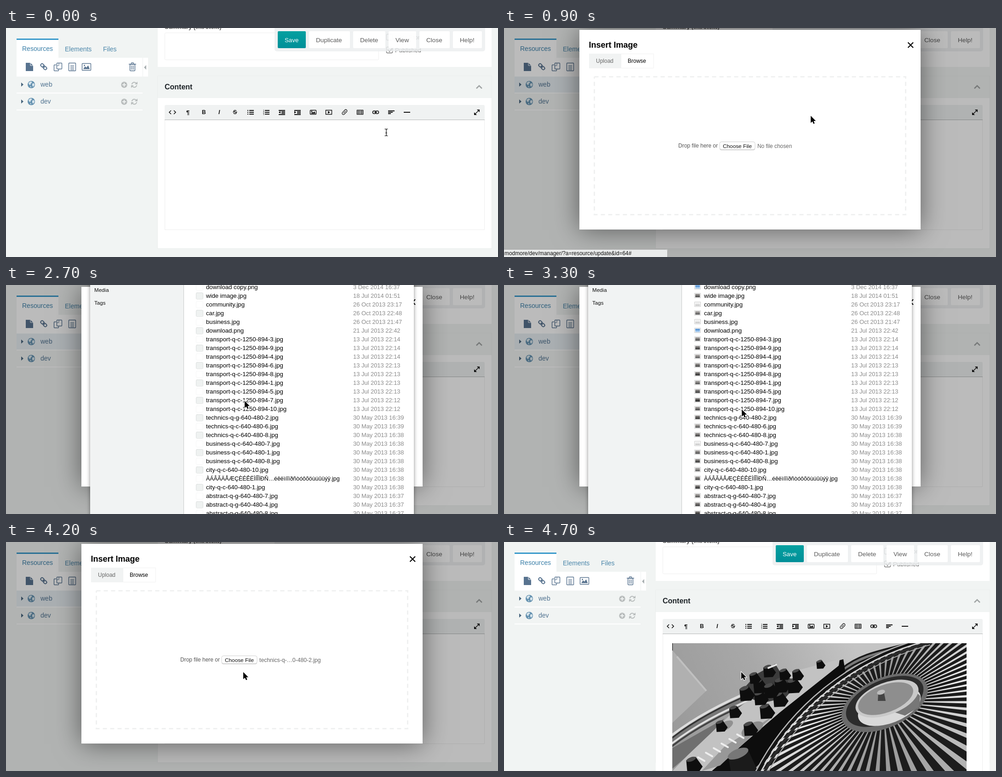
An HTML page with a canvas that plays this animation: 1070 by 500 pixels, repeating every 7.2 s.

```html
<!DOCTYPE html>
<html lang="en">
<head>
<meta charset="utf-8">
<title>Insert image</title>
<style>
html, body { margin: 0; width: 100%; height: 100%; overflow: hidden; background: #f1f4f3; }
canvas { display: block; }
</style>
</head>
<body>
<canvas id="stage" width="1070" height="500"></canvas>
<script>
const ctx = document.getElementById('stage').getContext('2d');
const LOOP = 7200, STEP = 100;
const SANS = '"Liberation Sans", Arial, sans-serif';
const BLUE = '#58738f';

// ---------- helpers ----------
function text(str, x, y, size, color, weight = '') {
  ctx.font = `${weight} ${size}px ${SANS}`;
  ctx.fillStyle = color;
  ctx.fillText(str, x, y);
}
function box(x, y, w, h, fill, r = 0) {
  ctx.beginPath();
  ctx.roundRect(x, y, w, h, r);
  ctx.fillStyle = fill;
  ctx.fill();
}
function frame(x, y, w, h, color, lw = 1, r = 0) {
  ctx.beginPath();
  ctx.roundRect(x, y, w, h, r);
  ctx.strokeStyle = color;
  ctx.lineWidth = lw;
  ctx.stroke();
}
function trace(p) {
  ctx.beginPath();
  for (let i = 0; i < p.length; i += 2) ctx.lineTo(p[i], p[i + 1]);
}
function poly(p, fill) {
  trace(p);
  ctx.closePath();
  ctx.fillStyle = fill;
  ctx.fill();
}
function line(p, color, lw = 1) {
  trace(p);
  ctx.strokeStyle = color;
  ctx.lineWidth = lw;
  ctx.stroke();
}
function oval(x, y, rx, ry, turn, fill) {
  ctx.beginPath();
  ctx.ellipse(x, y, rx, ry, turn, 0, 7);
  ctx.fillStyle = fill;
  ctx.fill();
}
function at(x, y, draw, turn = 0) {
  ctx.save();
  ctx.translate(x, y);
  ctx.rotate(turn);
  draw();
  ctx.restore();
}
const clamp = v => Math.max(0, Math.min(1, v));
const ease = v => v * v * (3 - 2 * v);
const mix = (a, b, p) => a + (b - a) * p;

// ---------- icons, drawn around 0,0 ----------
function chain(color, s) {
  ctx.save();
  ctx.rotate(Math.PI / 4);
  frame(-8 * s, -3 * s, 8 * s, 6 * s, color, 2, 3 * s);
  frame(0, -3 * s, 8 * s, 6 * s, color, 2, 3 * s);
  line([-3 * s, 0, 3 * s, 0], color, 2);
  ctx.restore();
}
function picture(color, w, h) {
  frame(-w / 2 + .5, -h / 2 + .5, w - 1, h - 1, color, 1.4, 1);
  poly([-w * .35, h * .3, -w * .15, -h * .08, 0, h * .1, w * .18, -h * .22, w * .36, h * .3], color);
  oval(-w * .22, -h * .2, 1.5, 1.5, 0, color);
}
function globe() {
  oval(0, 0, 8, 8, 0, '#6592b0');
  poly([-6, -4, -1, -7, 2, -5, -1, -2, -2, 1, -5, 0], '#d8e5ec');
  poly([2, -2, 6, -3, 7, 1, 4, 5, 2, 2], '#d8e5ec');
  poly([-3, 3, 0, 4, -1, 7], '#d8e5ec');
}
function refresh() {
  ctx.strokeStyle = '#b9bdbd';
  ctx.lineWidth = 2;
  for (const a of [3.3, .16]) {
    ctx.beginPath();
    ctx.arc(0, 0, 5.4, a, a + 2.3);
    ctx.stroke();
  }
  poly([7, -7, 7, -1, 1, -1], '#b9bdbd');
  poly([-7, 7, -7, 1, -1, 1], '#b9bdbd');
}
function bullets() {
  for (let y = -4; y <= 4; y += 4) {
    box(-7, y - 1, 2, 2, '#111');
    box(-3, y - 1, 10, 2, '#111');
  }
}
function numbers() {
  for (let i = 0; i < 3; i++) {
    text(String(i + 1), -7, i * 4 - 2, 4.5, '#111');
    box(-3, i * 4 - 5, 10, 2, '#111');
  }
}
function indent(dir) {
  box(-7, -5, 14, 2, '#111');
  box(-1, -2, 8, 2, '#111');
  box(-1, 1, 8, 2, '#111');
  box(-7, 4, 14, 2, '#111');
  poly(dir < 0 ? [-3, -3, -3, 3, -7, 0] : [-7, -3, -7, 3, -3, 0], '#111');
}
const tools = [
  () => { line([-3, -4, -7, 0, -3, 4], '#111', 1.6); line([3, -4, 7, 0, 3, 4], '#111', 1.6); },
  () => text('¶', -4, 5, 13, '#111', 'bold'),
  () => text('B', -4, 4, 12, '#111', 'bold'),
  () => text('I', -2, 4, 12, '#111', 'italic bold'),
  () => { text('S', -4, 4, 12, '#111', 'bold'); box(-5, -1, 10, 1, '#111'); },
  bullets,
  numbers,
  () => indent(-1),
  () => indent(1),
  hover => picture(hover ? '#777' : '#111', 14, 10),
  () => { frame(-6.5, -4.5, 13, 9, '#111', 1.4); poly([-2, -3, -2, 3, 3, 0], '#111'); },
  () => at(0, 0, () => {
    frame(-6, -2.8, 13, 5.6, '#222', 1.3, 2.8);
    line([4, 0, -3, 0], '#222', 1.3);
  }, -.8),
  () => {
    frame(-6.5, -4.5, 13, 9, '#111', 1.4);
    line([-6, -1.5, 6, -1.5], '#111'); line([-6, 1.5, 6, 1.5], '#111');
    line([-2.5, -4, -2.5, 4], '#111'); line([2.5, -4, 2.5, 4], '#111');
  },
  () => {
    frame(-6.5, -3, 7, 6, '#111', 1.6, 3);
    frame(-.5, -3, 7, 6, '#111', 1.6, 3);
    line([-3, 0, 3, 0], '#111', 1.6);
  },
  () => { box(-7, -4, 14, 2, '#111'); box(-7, -1, 10, 2, '#111'); box(-7, 2, 6, 2, '#111'); },
  () => box(-7, -1, 14, 2, '#111')
];

// ---------- page ----------
function sidebar(dimmed) {
  box(23, 23, 91, 42, '#fff');
  box(23, 23, 91, 3, '#3a9acb');
  text('Resources', 35, 50, 14, '#3a7fa8');
  text('Elements', 128, 51, 14, '#4b86aa');
  text('Files', 211, 51, 14, '#4b86aa');
  box(23, 65, 286, 41, '#fff');
  box(297, 65, 1, 41, '#edefef');
  poly([305, 81, 305, 91, 300, 86], '#a9b0b2');

  poly([43, 76, 53, 76, 59, 82, 59, 94, 43, 94], BLUE);
  line([53, 76, 53, 82, 59, 82], '#fff');
  at(82, 84.5, () => chain(BLUE, 1));
  frame(104.5, 80.5, 10, 13, BLUE, 1.4, 1);
  box(109, 75, 13, 15, '#fff');
  frame(110.5, 76.5, 11, 13, BLUE, 1.4, 1);
  line([110, 82, 115, 82, 115, 76], BLUE);
  frame(136.5, 76.5, 15, 17, BLUE, 1.4, 1);
  for (let y = 82; y < 92; y += 3) line([140, y, 148, y], BLUE, 1.2);
  at(175, 85, () => picture(BLUE, 20, 16));
  frame(269.5, 79.5, 11, 14, BLUE, 1.4, 1.5);
  line([267, 79, 283, 79], BLUE, 1.5);
  line([272, 78, 273, 76, 277, 76, 278, 78], BLUE, 1.3);
  for (let x = 272.5; x < 280; x += 2.5) line([x, 82, x, 91], BLUE);

  if (dimmed) box(23, 106, 274, 35, 'rgba(110,160,225,.07)');
  ['web', 'dev'].forEach((name, i) => {
    const y = 123.5 + i * 37;
    poly([33, y - 4.5, 38, y, 33, y + 4.5], '#48667e');
    at(55, y, globe);
    text(name, 75, y + 4.5, 14, '#517391');
    oval(257, y + .5, 6.7, 6.7, 0, '#b9bdbd');
    line([253, y + .5, 261, y + .5], '#f1f4f3', 2);
    line([257, y - 3.5, 257, y + 4.5], '#f1f4f3', 2);
    at(279, y + .5, refresh);
    box(23, y + 17.5, 274, 2, '#fff');
  });
}

function actionBar() {
  ctx.globalAlpha = .84;
  box(584, -6, 458, 57, '#eceff0', 5);
  ctx.globalAlpha = 1;
  const teal = ctx.createLinearGradient(0, 7, 0, 44);
  teal.addColorStop(0, '#05a0a0');
  teal.addColorStop(1, '#008f98');
  box(591, 7, 61, 37, teal, 2);
  text('Save', 606, 31, 13.3, '#fff');
  const buttons = [['Duplicate', 659, 89], ['Delete', 755, 70], ['View', 832, 60], ['Close', 899, 66], ['Help!', 972, 63]];
  for (const [name, x, w] of buttons) {
    box(x, 7, w, 37, name === 'View' ? 'rgba(255,255,255,.92)' : '#fff', 2);
    text(name, x + 15, 31, 13.6, '#5b5b5b');
  }
}

function page(hover, photo, dimmed) {
  box(0, 0, 1070, 500, '#f1f4f3');
  sidebar(dimmed);
  box(330, 0, 726, 85, '#fff');
  text('Summary (introtext)', 345, 2, 13, '#555', 'bold');
  frame(345.5, 10.5, 465, 59, '#efefef', 1, 2);
  frame(827.5, 13.5, 13, 13, '#888', 1.3, 2);
  text('Hide From Menus', 846, 25, 13, '#555');
  frame(827.5, 41.5, 13, 13, '#777', 1.3, 2);
  line([830, 47, 834, 51, 842, 42], '#666', 2.4);
  text('Published', 846, 53, 13, '#555');
  actionBar();

  frame(329.5, 104.5, 727, 377, 'rgba(0,0,0,.025)');
  text('Content', 345, 134, 16, '#1d2327', 'bold');
  line([1023, 132, 1029, 126, 1035, 132], '#a0a4a4', 2.6);
  box(330, 153, 726, photo ? 347 : 328, '#fff');
  box(345, 168, 696, 32, '#f0f2f2', [3, 3, 0, 0]);
  frame(345.5, 200.5, 695, photo ? 320 : 240, '#ededed');
  box(345, 200, 696, 1, '#b4b6b6');
  tools.forEach((draw, i) => at(362 + i * 34, 184, () => draw(hover)));
  line([1020, 188, 1028, 180], '#111', 1.5);
  poly([1024, 178, 1030, 178, 1030, 184], '#111');
  poly([1018, 184, 1018, 190, 1024, 190], '#111');
  if (photo) {
    drawPhoto();
    box(366, 221, 1, 16, '#000');
  }
}

// ---------- picture of a mixer and a turntable ----------
function rim(d) {
  ctx.beginPath();
  ctx.moveTo(545 + d, 506 + d * .6);
  ctx.bezierCurveTo(600 + d, 395 + d * .6, 715 + d, 265 + d * .6, 905 + d, 212 + d * .6);
}
function strokeRim(d, color, lw) {
  rim(d);
  ctx.strokeStyle = color;
  ctx.lineWidth = lw;
  ctx.stroke();
}
function knob(x, y, r) {
  at(x, y, () => {
    poly([-r * .6, -r * .9, r * .6, -r * .9, r, r * .5, r * .3, r, -r, r * .6], '#0e0e0e');
    oval(0, -r * .8, r * .6, r * .25, 0, '#4a4a4a');
  }, -.35);
}
function mixer() {
  poly([366, 500, 440, 430, 640, 282, 738, 256, 745, 300, 640, 400, 540, 500], '#0d0d0d');
  poly([366, 500, 400, 465, 505, 365, 620, 285, 730, 256, 728, 270, 600, 372, 452, 500], '#c2c2c2');
  poly([430, 500, 480, 446, 585, 380, 470, 488], '#989898');
  poly([512, 330, 550, 288, 590, 266, 604, 290, 642, 306, 612, 340, 560, 352], '#3c3c3c');
  for (let i = 0; i < 6; i++) line([422 + i * 17, 470 - i * 10, 436 + i * 17, 478 - i * 10], '#eee', 4);
  oval(540, 408, 26, 12, -.5, '#8c8c8c');
  oval(480, 402, 20, 9, -.5, '#919191');
  const knobs = [[502, 372, 14], [571, 371, 17], [535, 409, 16], [472, 403, 13], [558, 342, 16], [600, 345, 17],
    [527, 332, 17], [556, 316, 16], [580, 326, 17], [603, 314, 17], [631, 315, 17], [576, 283, 14], [545, 298, 13],
    [610, 290, 13], [638, 291, 13], [688, 268, 10], [412, 488, 18]];
  for (const k of knobs) knob(...k);
  line([575, 275, 592, 268], '#e4e4e4', 4);
  poly([488, 468, 530, 452, 552, 500, 494, 506], '#1b1b1b');
  oval(509, 462, 24, 10, -.4, '#777');
}
function platter() {
  rim(0);
  ctx.lineTo(1010, 212);
  ctx.lineTo(1010, 506);
  ctx.closePath();
  ctx.fillStyle = '#1c1c1c';
  ctx.fill();
  ctx.save();
  ctx.clip();
  const cx = 824, cy = 348, cos = Math.cos(-.42), sin = Math.sin(-.42), spokes = 64;
  const spot = (a, r) => {
    const u = Math.cos(a) * r, v = Math.sin(a) * r * .56;
    return [cx + u * cos - v * sin, cy + u * sin + v * cos];
  };
  for (let i = 0; i < spokes; i++) {
    const a = i * 2 * Math.PI / spokes, lit = 195 + 40 * Math.sin(a * 2 + 1);
    poly([...spot(a - .012, 80), ...spot(a + .012, 80), ...spot(a + .021, 520), ...spot(a - .021, 520)],
      `rgb(${lit},${lit},${lit})`);
  }
  strokeRim(3, '#151515', 9);
  strokeRim(9, '#d5d5d5', 3);
  strokeRim(15, '#2a2a2a', 6);
  strokeRim(21, '#aaa', 2);
  ctx.restore();
  strokeRim(0, '#b5b5b5', 2.5);

  oval(828, 351, 100, 54, -.42, '#6b6b6b');
  oval(828, 348, 90, 46, -.42, '#2c2c2c');
  oval(838, 359, 72, 36, -.38, '#d9d9d9');
  poly([880, 312, 905, 336, 903, 360, 872, 379, 850, 372], '#777');
  oval(833, 342, 72, 35, -.36, '#c9c9c9');
  oval(830, 342, 63, 30, -.36, '#8e8e8e');
  poly([813, 347, 814, 328, 826, 326, 830, 347], '#444');
  oval(820, 328, 9, 5, -.3, '#bbb');
}
function drawPhoto() {
  ctx.save();
  ctx.beginPath();
  ctx.rect(366, 221, 640, 279);
  ctx.clip();
  const wall = ctx.createLinearGradient(366, 400, 760, 221);
  wall.addColorStop(0, '#9a9a9a');
  wall.addColorStop(.5, '#a8a8a8');
  wall.addColorStop(1, '#c4c4c4');
  box(366, 221, 640, 279, wall);
  poly([366, 236, 440, 325, 366, 395], '#b0b0b0');
  line([376, 250, 440, 325], '#c0c0c0', 4);

  // second deck at the left
  ctx.lineCap = 'round';
  for (const [d, c, w] of [[12, '#777', 14], [0, '#ddd', 5], [6, '#333', 3], [18, '#e0e0e0', 4], [24, '#444', 4]]) {
    ctx.beginPath();
    ctx.moveTo(360, 426 + d);
    ctx.quadraticCurveTo(430, 370 + d, 545, 322 + d);
    ctx.strokeStyle = c;
    ctx.lineWidth = w;
    ctx.stroke();
  }
  poly([366, 450, 480, 385, 430, 440, 366, 495], '#6f6f6f');

  // cables
  for (let i = 0; i < 5; i++) {
    ctx.beginPath();
    ctx.moveTo(735, 276 + i * 5);
    ctx.bezierCurveTo(780, 240 + i * 5, 830, 236 + i * 4, 900, 216 + i * 3);
    ctx.strokeStyle = i % 2 ? '#777' : '#1c1c1c';
    ctx.lineWidth = 4;
    ctx.stroke();
  }
  mixer();
  platter();
  ctx.restore();
}

// ---------- dialogs ----------
function modal(pressed, chosen) {
  ctx.save();
  ctx.shadowColor = 'rgba(0,0,0,.5)';
  ctx.shadowBlur = 54;
  ctx.shadowOffsetY = 1;
  box(164, 4, 742, 436, '#fff');
  ctx.restore();
  text('Insert Image', 184.5, 43, 18, '#000', 'bold');
  line([878.5, 31.5, 890, 43], '#000', 2.2);
  line([890, 31.5, 878.5, 43], '#000', 2.2);
  box(185, 56, 69, 32, '#f1f3f3');
  frame(254.5, 56.5, 71, 31, '#f1f1f1');
  text('Upload', 200, 76, 12, '#666');
  text('Browse', 269, 76, 12, '#000');
  ctx.setLineDash([9, 7]);
  frame(196.5, 106.5, 677, 301, '#f0f1f1', 3);
  ctx.setLineDash([]);
  text('Drop file here or', 379, 261, 12, '#555');
  box(469, 249, 77, 18, '#d3d3d3', 4);
  box(469, 248, 77, 17, pressed ? '#dcdcdc' : '#fff', 4);
  frame(469, 248.5, 77, 17, '#d0d0d0', 1, 4);
  text('Choose File', 476, 261.5, 11.8, '#111');
  if (chosen) text('technics-q-…0-480-2.jpg', 551, 261.5, 12.2, '#666');
  else text('No file chosen', 551, 261.5, 11.9, '#666');
}

const files = [
  ['download copy.png', '3 Dec 2014 16:37'], ['wide image.jpg', '18 Jul 2014 01:51'],
  ['community.jpg', '26 Oct 2013 23:17'], ['car.jpg', '26 Oct 2013 22:48'],
  ['business.jpg', '26 Oct 2013 21:47'], ['download.png', '21 Jul 2013 22:42']
];
function addFiles(stem, ids, day) {
  for (const id of ids.split(' ')) {
    const [n, time] = id.split('@');
    files.push([`${stem}-${n}.jpg`, `${day} ${time}`]);
  }
}
const JULY = '13 Jul 2013', MAY = '30 May 2013';
addFiles('transport-q-c-1250-894', '3@22:14 9@22:14 4@22:14 6@22:13 8@22:13 1@22:13 5@22:13 7@22:12 10@22:12', JULY);
addFiles('technics-q-g-640-480', '2@16:39', MAY);
addFiles('technics-q-c-640-480', '6@16:39 8@16:38', MAY);
addFiles('business-q-c-640-480', '7@16:38 1@16:38 8@16:38', MAY);
addFiles('city-q-c-640-480', '10@16:38', MAY);
files.push(['ÀÁÂÃÄÅÆÇÈÉÊËÌÍÎÏÐÑ…éêëìíîïðñòóôõöùúûüýÿ.jpg', MAY + ' 16:38']);
addFiles('city-q-c-640-480', '1@16:38', MAY);
addFiles('abstract-q-g-640-480', '7@16:37 4@16:37 8@16:37', MAY);

function thumb(i, y) {
  box(414, y - 6, 14, 11, '#c9c9c9', 1);
  box(415, y - 5, 12, 9, '#fff');
  const pale = i === 2 || i === 4 || i === 18, sky = i === 0 || i === 5;
  const tone = 70 + (i * 37) % 60;
  box(416, y - 4, 10, 7, pale ? '#eee' : sky ? '#5f9ad8' : `rgb(${tone + 30},${tone + 27},${tone + 25})`);
  box(416, y, 10, 3, pale ? '#ccc' : sky ? '#a9cdf0' : `rgb(${tone - 25},${tone - 25},${tone - 25})`);
}

function sheet(loaded, selected) {
  ctx.save();
  ctx.shadowColor = 'rgba(0,0,0,.45)';
  ctx.shadowBlur = 8;
  box(183, -40, 704, 560, '#fff');
  ctx.restore();
  box(183, -40, 203, 560, '#f1f3f3');
  box(386, -40, 1, 560, '#c8caca');
  text('Media', 192, 15, 11.6, '#111');
  text('Tags', 192, 43, 11.6, '#111');
  files.forEach(([name, date], i) => {
    const y = 4.5 + i * 19, on = selected && i === 15;
    if (on) box(387, y - 9.5, 500, 18, '#1170e4');
    if (i < loaded) thumb(i, y);
    else {
      box(413.5, y - 7, 15, 14, i % 2 ? '#eff2f1' : '#fff', 2);
      ctx.setLineDash([2, 1]);
      frame(413.5, y - 6.5, 15, 14, i % 2 ? '#cfd3d2' : '#f0f1f1', 1, 2);
      ctx.setLineDash([]);
    }
    text(name, 435, y + 4, name[0] === 'À' ? 12.4 : 13.2, on ? '#fff' : '#000');
    text(date, 755, y + 4, 12.9, on ? '#fff' : '#8a8a8a');
  });
}

function tooltip() {
  box(627, 200, 83, 22, '#000', 2);
  text('Insert Image', 635, 215, 12.05, '#fff');
}
function statusBar() {
  box(-4, 483, 360, 22, '#e9ebeb', 3);
  frame(-4.5, 483.5, 360, 22, '#a9a9a9', 1, 3);
  text('modmore/dev/manager/?a=resource/update&id=64#', 1, 496, 11.9, '#111');
}

// ---------- pointer ----------
function beam() {
  line([-3.5, -7.5, -1, -7.5, 0, -6.5, 1, -7.5, 3.5, -7.5], '#111', 1.2);
  line([-3.5, 7.5, -1, 7.5, 0, 6.5, 1, 7.5, 3.5, 7.5], '#111', 1.2);
  line([0, -7, 0, 7], '#111', 1.3);
  line([-2, 1, 2, 1], '#111');
}
function hand() {
  const p = [-1, 0, 1, 0, 2, 1, 2.5, 6, 4, 5.2, 5, 6, 6.5, 5.6, 7.5, 6.6, 9, 6.6, 9.6, 8, 8.8, 12, 7.6, 15.5, 0, 15.5, -4.5, 9.5, -4, 8, -2.6, 8, -.8, 10];
  poly(p, '#fff');
  ctx.lineJoin = 'round';
  trace([...p, -1.5, 1, -1, 0]);
  ctx.strokeStyle = '#000';
  ctx.lineWidth = 1.2;
  ctx.stroke();
  for (const x of [2.2, 4.2, 6.2]) line([x, 10, x + .2, 13.5], '#000', .9);
}
function arrow() {
  const p = [0, 0, 0, 15.5, 3.6, 12.2, 6, 17.6, 8.6, 16.5, 6.3, 11.2, 11, 11.2];
  trace(p);
  ctx.closePath();
  ctx.strokeStyle = '#fff';
  ctx.lineWidth = 2;
  ctx.stroke();
  poly(p, '#000');
}
// start, end, from x, from y, to x, to y
const moves = [
  [0, 400, 827, 228, 677, 188],
  [800, 1400, 677, 188, 543, 238],
  [1400, 1800, 543, 238, 519, 253],
  [2900, 3600, 519, 253, 516, 284]
];
function pointer(t) {
  const m = moves.filter(v => v[0] <= t).pop();
  const p = ease(clamp((t - m[0]) / (m[1] - m[0])));
  const shape = t < 300 ? beam : t < 900 ? hand : arrow;
  at(mix(m[2], m[4], p), mix(m[3], m[5], p), shape);
}

// ---------- timeline ----------
function render(t) {
  // the modal opens at once; on closing the shade drops first, then the box fades
  const shade = t >= 800 && t < 4500;
  const hover = t >= 400 && t < 800;
  page(hover, t >= 4500, shade);
  if (shade) box(0, 0, 1070, 500, 'rgba(0,0,0,.265)');
  if (t >= 800 && t < 4700) {
    ctx.globalAlpha = clamp((4700 - t) / 300);
    modal(t === 2000, t >= 4200);
    ctx.globalAlpha = 1;
  }
  if (hover) tooltip();
  if (t >= 300 && t < 1000) statusBar();
  const drop = clamp(t < 3000 ? (t - 2200) / 300 : (4000 - t) / 200);
  if (drop > 0) {
    const loaded = Math.round(clamp((t - 2700) / 600) * files.length);
    at(0, Math.round(-525 * (1 - ease(drop))), () => sheet(loaded, t >= 3600));
  }
  pointer(t);
}

const start = performance.now();
let last = -1;
function tick() {
  const t = Math.floor(((performance.now() - start) % LOOP) / STEP) * STEP;
  if (t !== last) {
    last = t;
    render(t);
  }
  requestAnimationFrame(tick);
}
tick();
</script>
</body>
</html>
```
